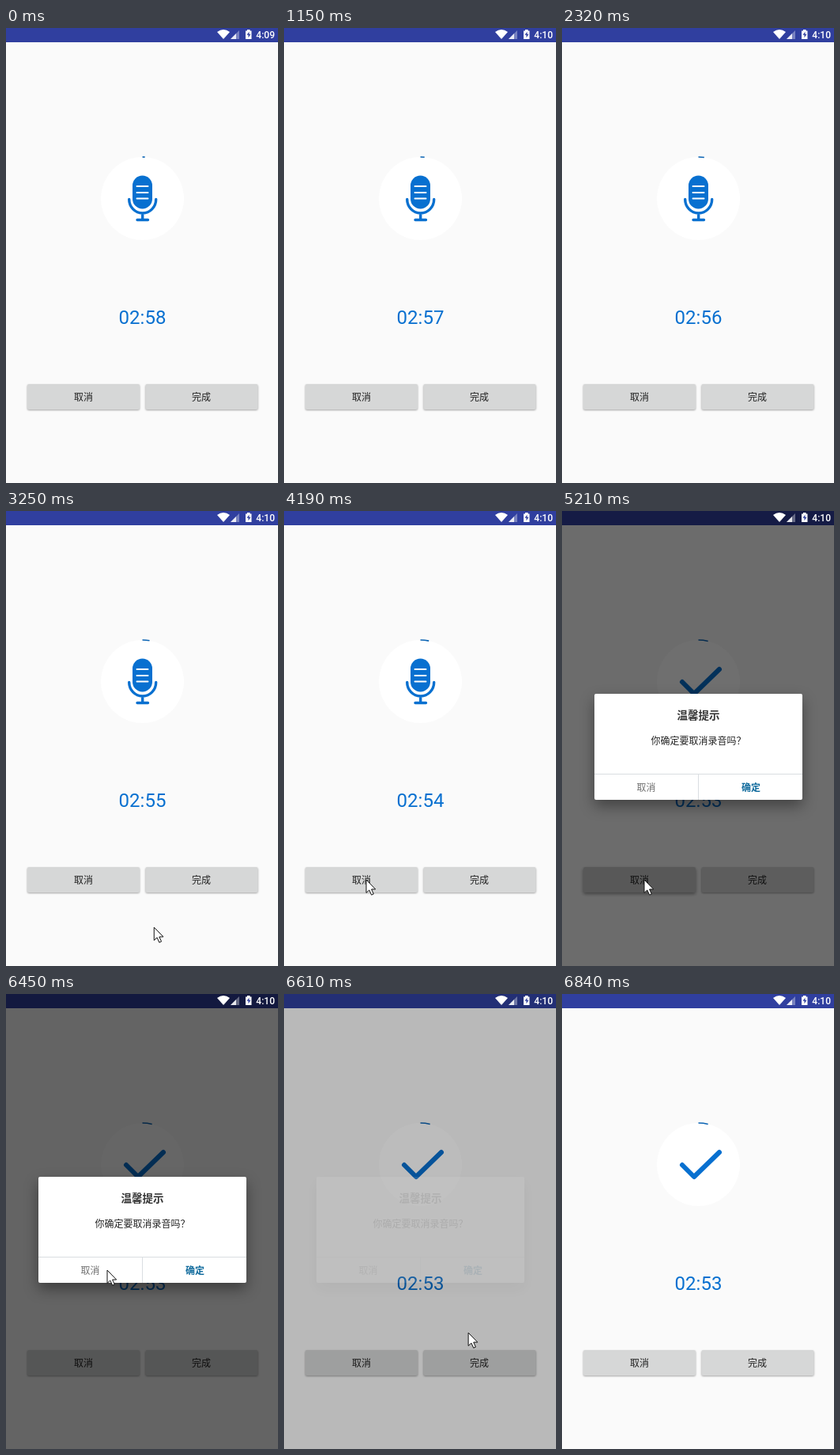
Write an HTML page that moves like this. It is 344 px wide and 575 px high and loops after 7300 ms.

```html
<!DOCTYPE html>
<html lang="zh-CN">
<head>
<meta charset="utf-8">
<title>录音</title>
<style>
  html, body { margin: 0; width: 100%; height: 100%; overflow: hidden; background: #fafafa; }
  svg { display: block; width: 344px; height: 575px; }
  text { font: 12px "Noto Sans CJK SC", "Noto Sans CJK", sans-serif; text-anchor: middle; fill: #212121; }
  .blue { stroke: #0870d0; fill: none; stroke-linecap: round; stroke-linejoin: round; }
  .button { fill: #d6d7d7; filter: drop-shadow(0 1px 1px rgba(0, 0, 0, .35)); }
  .button.pressed { filter: drop-shadow(0 2px 2px rgba(0, 0, 0, .4)); }
  #timer { font: 24px Roboto, sans-serif; fill: #0870d0; }
  #clock { font: 500 12px Roboto, sans-serif; fill: #fff; text-anchor: end; }
  .sheet { fill: #fff; filter: drop-shadow(0 8px 9px rgba(0, 0, 0, .38)); }
  .title { font-size: 13.5px; font-weight: 700; fill: #333; }
  .cancel { fill: #707070; }
  .confirm { font-weight: 700; fill: #0f6a9c; }
</style>
</head>
<body>
<svg viewBox="0 0 344 575">
  <clipPath id="cancelClip"><rect x="27" y="450" width="142" height="32" rx="2"/></clipPath>

  <rect width="344" height="575" fill="#fafafa"/>
  <rect width="344" height="18" fill="#303f9f"/>

  <circle cx="172.5" cy="215.5" r="52.5" fill="#fff"/>
  <path id="progress" fill="none" stroke="#0b64b4" stroke-width="1.6"/>
  <g id="mic">
    <rect x="160" y="186.5" width="25" height="42" rx="12.5" fill="#0870d0"/>
    <path d="M165.5 200h14M165.5 208h14M165.5 215.5h14" stroke="#fff" stroke-width="2" stroke-linecap="round"/>
    <path class="blue" stroke-width="3.4" d="M155.7 216.5a17 17.5 0 0 0 34 0M172.7 234v8M166 242.5h13.5"/>
  </g>
  <path id="check" class="blue" stroke-width="6" d="M152 216l15 15 32-31"/>
  <text id="timer" x="172.5" y="374"></text>

  <rect id="cancelButton" class="button" x="27" y="450" width="142" height="32" rx="2"/>
  <circle id="ripple" cx="102" cy="466" clip-path="url(#cancelClip)"/>
  <rect class="button" x="176.5" y="450" width="142" height="32" rx="2"/>
  <text x="98" y="470.5">取消</text>
  <text x="247" y="470.5">完成</text>

  <rect id="dim" width="344" height="575"/>

  <g fill="#fff">
    <path d="M267 5Q275 -1 283 5L275 14Z"/>
    <path d="M284 14h11V3z" opacity=".35"/>
    <path d="M284 14h7V7z" opacity=".85"/>
    <path d="M303 3.5h2V2h3.500v1.500h2V14H303z"/>
    <path d="M307.500 4.800l-3 4h2v3.400l3-4.400h-2z" fill="#303f9f"/>
  </g>
  <text id="clock" x="340" y="13"></text>

  <g id="dialog">
    <rect class="sheet" x="41" y="231" width="263" height="134" rx="2"/>
    <path d="M41 332.500h263M172.500 333v32" stroke="#dadee1"/>
    <text class="title" x="172.500" y="263">温馨提示</text>
    <text class="message" x="172.500" y="295">你确定要取消录音吗？</text>
    <text class="cancel" x="106.500" y="353.500">取消</text>
    <text class="confirm" x="239" y="353.500">确定</text>
  </g>

  <path id="cursor" d="M0 0V16.500L3.800 13 6.600 19.200 9.300 18 6.600 12H11.700Z" fill="#fff" stroke="#111" stroke-linejoin="round"/>
</svg>
<script>
const LOOP = 7300, FRAME = 78.05, FIRST_FRAME = 124;
const PAUSED = 5000, TICK = 1020, FIRST_TICK = 540;
const $ = id => document.getElementById(id);
const set = (id, attrs) => Object.entries(attrs).forEach(([k, v]) => $(id).setAttribute(k, v));
const ramp = (t, from, to) => Math.min(1, Math.max(0, (t - from) / (to - from)));
const smooth = p => p * p * (3 - 2 * p);
const linear = p => p;

// Cursor moves: start and end time, start and end point, easing
const moves = [
  [2870, 3650, [262, 580], [104, 466], smooth],
  [5450, 5750, [103, 466], [153, 448], smooth],
  [5750, 6120, [153, 448], [117, 342], smooth],
  [6370, 6446, [117, 342], [128, 349], linear],
  [6446, 6602, [128, 349], [233, 428], p => p ** 1.3],
  [6602, 6800, [233, 428], [390, 546], linear]
];

function cursorAt(t) {
  const [start, end, a, b, ease] = moves.findLast(m => t >= m[0]) || moves[0];
  const p = ease(ramp(t, start, end));
  return a.map((v, i) => v + (b[i] - v) * p);
}

function draw(t) {
  const running = Math.min(t, PAUSED);
  const ticks = Math.max(0, Math.floor((running - FIRST_TICK) / TICK) + 1);
  $('timer').textContent = '02:' + (58 - ticks);
  $('clock').textContent = t < 1000 ? '4:09' : '4:10';

  const angle = (1.7 + running / 1000) * Math.PI / 90;
  const x = 172.5 + 52.5 * Math.sin(angle), y = 215.5 - 52.5 * Math.cos(angle);
  set('progress', { d: `M172.500 163A52.500 52.500 0 0 1 ${x} ${y}` });
  set('mic', { visibility: t < PAUSED ? 'visible' : 'hidden' });
  set('check', { visibility: t < PAUSED ? 'hidden' : 'visible' });

  $('cancelButton').classList.toggle('pressed', t > 4700 && t < 5300);
  set('ripple', {
    r: 30 * ramp(t, 4700, 4880) + 17 * ramp(t, 4980, 5035) + 45 * ramp(t, 5045, 5250),
    opacity: t < 4700 ? 0 : .07 * (1 - ramp(t, 5100, 5450))
  });

  const closing = t > 6000;
  set('dim', { opacity: .6 * (closing ? 1 - ramp(t, 6490, 6690) : ramp(t, 5009, 5209)) });
  set('dialog', { opacity: closing ? 1 - ramp(t, 6490, 6612) : ramp(t, 5009, 5089) });
  set('cursor', { transform: `translate(${cursorAt(t)})` });
}

// The picture advances in steps, like a screen recording
function loop(now) {
  const t = now % LOOP;
  draw(Math.max(0, FIRST_FRAME + Math.floor((t - FIRST_FRAME) / FRAME) * FRAME));
  requestAnimationFrame(loop);
}
requestAnimationFrame(loop);
</script>
</body>
</html>
```
